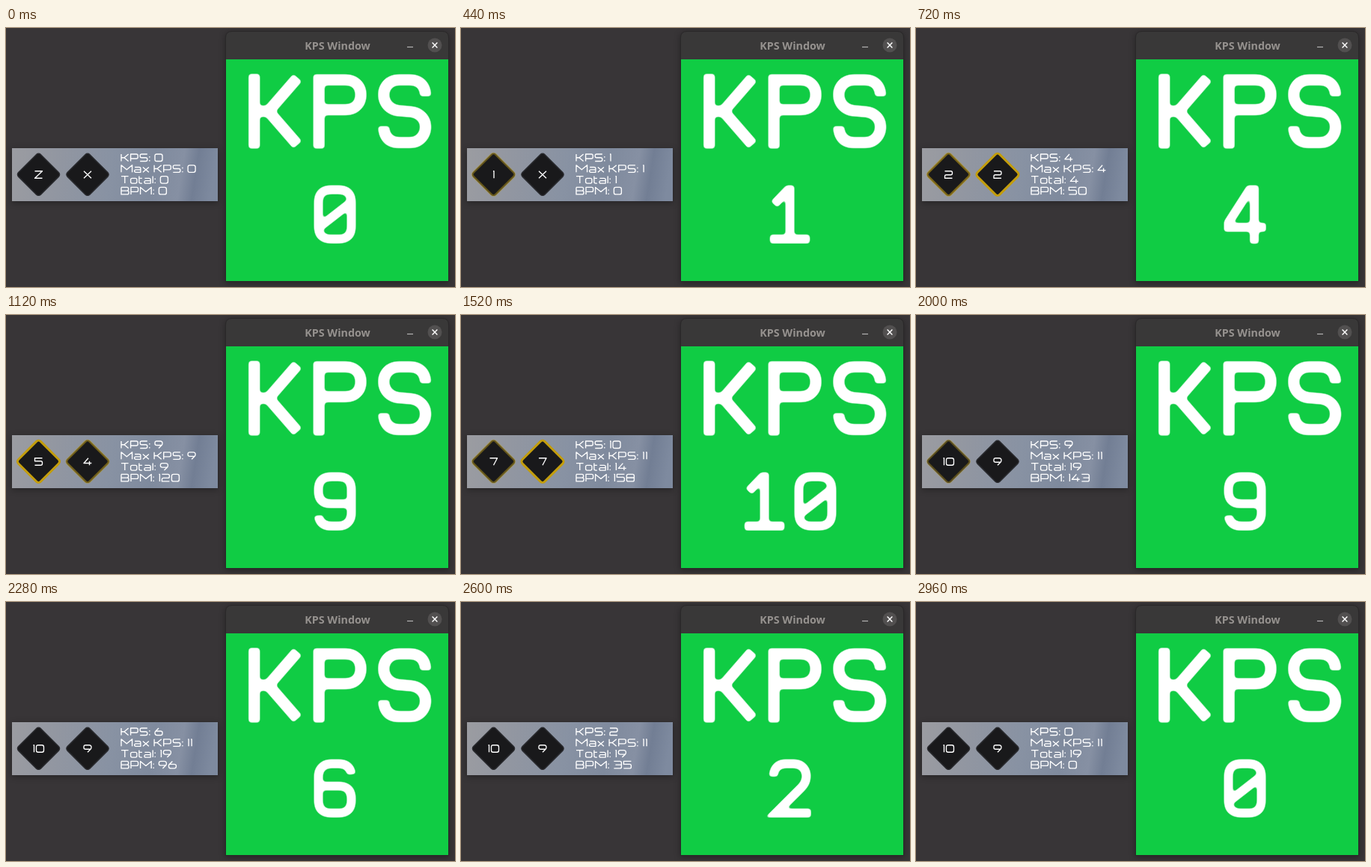
An HTML page that plays this animation: 600x347 px, repeating every 3.16 s.

```html
<!DOCTYPE html>
<html lang="en">
<head>
<meta charset="utf-8">
<title>Key counter</title>
<style>
html, body { margin: 0; height: 100%; overflow: hidden; background: #383537; }
svg { display: block; width: 100vw; height: 100vh; }
.big { fill: none; stroke: #fff; stroke-width: 15.2; filter: url(#soften); }
.small { fill: none; stroke: #fff; stroke-width: 1.35; stroke-linejoin: round; }
.title { font: 700 14.3px "Open Sans", "Noto Sans", sans-serif; fill: #96928f; text-anchor: middle; }
.raised { filter: drop-shadow(0 2px 4px #0005); }
</style>
</head>
<body>
<svg viewBox="0 0 600 347" role="img" aria-label="Keys per second counter">
  <defs>
    <linearGradient id="steel" x2="1" y2=".04">
      <stop offset="0" stop-color="#9b9ca1"/>
      <stop offset=".25" stop-color="#9196a1"/>
      <stop offset=".5" stop-color="#8892a3"/>
      <stop offset=".7" stop-color="#7f8a9d"/>
      <stop offset=".84" stop-color="#8690a3"/>
      <stop offset=".91" stop-color="#727e94"/>
      <stop offset="1" stop-color="#7e8a9f"/>
    </linearGradient>
    <!-- rounds the corners of the big lettering -->
    <filter id="soften" x="-25%" y="-25%" width="150%" height="150%">
      <feGaussianBlur stdDeviation="2"/>
      <feComponentTransfer><feFuncA type="linear" slope="4" intercept="-1.5"/></feComponentTransfer>
    </filter>
  </defs>

  <rect class="raised" x="8" y="161" width="275" height="71" fill="url(#steel)"/>
  <g id="keys"></g>
  <g id="stats" class="small"></g>

  <path class="raised" d="M293.5 339.5V13q0-8.500 8.500-8.500H583q8.500 0 8.500 8.500V339.500Z" fill="#393838" stroke="#2a2829"/>
  <path d="M294 42H591V339H294Z" fill="#10cc44"/>
  <text class="title" x="443" y="28.500">KPS Window</text>
  <path d="M536 25.500H544" stroke="#b5b3b2" stroke-width="1.200"/>
  <circle cx="573" cy="23" r="9.500" fill="#525050"/>
  <path d="M569.600 19.600l6.800 6.800m0-6.800l-6.800 6.800" stroke="#fff" stroke-width="1.400"/>
  <g id="heading" class="big"></g>
  <g id="count" class="big"></g>
</svg>

<script>
const LOOP = 3160, STEP = 40, LAST = 2960;
const SPAN = 840;                       // window in which presses count as current
const presses = Array.from({ length: 19 }, (_, i) => 440 + 79 * i);
const tempo = [[440, 0], [720, 50], [1120, 120], [1520, 158], [1800, 160],
               [1900, 160], [2280, 96], [2780, 0], [LOOP, 0]];

// Heavy centre lines in a 72 x 100 box
const heavy = {
  K: "M8 0V100M8 50H28M66 5L27 50L66 95",
  P: "M8 100V8H44C56 8 64 16 64 28S56 48 44 48H8",
  S: "M64 30C64 15 55 8 44 8H28C16 8 8 17 8 28S16 49 30 49.5L42 50.5C56 51 64 60 64 71S56 92 44 92H28C16 92 8 85 8 70",
  0: "M8 29Q8 8 29 8H43Q64 8 64 29V71Q64 92 43 92H29Q8 92 8 71ZM9 72L63 30",
  1: "M9 33L33 8H36V92M2 92H70",
  2: "M8 30C8 15 17 8 28 8H44C56 8 64 17 64 29Q64 40 56 48L12 92H72",
  3: "M8 27C8 14 18 8 28 8H44C56 8 64 17 64 28S56 49 42 49H26M42 49C56 49 64 60 64 71S56 92 44 92H28C16 92 8 85 8 73",
  4: "M52 100V8H44L8 64V72H72",
  5: "M64 8H10V44H42C56 44 64 54 64 67S56 92 44 92H28C16 92 8 85 8 74",
  6: "M64 26C63 14 55 8 44 8H28C16 8 8 17 8 29V71Q8 92 29 92H43Q64 92 64 71V67Q64 46 43 46H8",
  7: "M0 8H62L28 100",
  8: "M29 8H43Q62 8 62 28T43 48H29Q10 48 10 28T29 8ZM29 48H43Q64 48 64 70T43 92H29Q8 92 8 70T29 48Z",
  9: "M8 74C9 86 17 92 28 92H44C56 92 64 83 64 71V29Q64 8 43 8H29Q8 8 8 29V33Q8 54 29 54H64"
};

// Thin centre lines: [width, path], capitals 9.5 high
const thin = {
  0: [10, "M2.500 0H7.500Q10 0 10 2.500V7Q10 9.500 7.500 9.500H2.500Q0 9.500 0 7V2.500Q0 0 2.500 0Z"],
  1: [1, "M0 0H1V9.5"],
  2: [10, "M0 0H8Q10 0 10 2V3Q10 5 8 5H2Q0 5 0 7V9.5H10"],
  3: [10, "M0 0H8Q10 0 10 2V7.5Q10 9.5 8 9.5H0M2 4.7H10"],
  4: [10, "M6 0L0 6.8H10.3M7.5 4V9.5"],
  5: [10, "M10 0H0V4H8Q10 4 10 6V7.5Q10 9.5 8 9.5H0"],
  6: [10, "M5 0L.8 4.2Q0 5 0 6.5Q0 9.5 3 9.5H7.5Q10 9.5 10 7.2V6Q10 4 7.5 4H1"],
  7: [10, "M0 0H10L5 9.5"],
  8: [10, "M2 0H8Q10 0 10 2V7.5Q10 9.5 8 9.5H2Q0 9.5 0 7.5V2Q0 0 2 0ZM0 4.6H10"],
  9: [10, "M5 9.5L9.2 5.3Q10 4.5 10 3Q10 0 7 0H2.5Q0 0 0 2.3V3.5Q0 5.5 2.5 5.5H9"],
  K: [9.6, "M0 0V9.5M9.6 0L4 4.7H0M4 4.7L9.6 9.5"],
  P: [9.6, "M0 9.5V0H7.6Q9.6 0 9.6 2V4Q9.6 6 7.6 6H0"],
  S: [9.6, "M9.6 0H2Q0 0 0 2V2.7Q0 4.7 2 4.7H7.6Q9.6 4.7 9.6 6.7V7.5Q9.6 9.5 7.6 9.5H0"],
  M: [14.6, "M0 9.5V0L7.3 6L14.6 0V9.5"],
  B: [10, "M0 0V9.5H8Q10 9.5 10 7.5V6.7Q10 4.7 8 4.7H0M8 4.7Q9.6 4.7 9.6 2.7V2Q9.6 0 8 0H0"],
  T: [9.6, "M0 0H9.6M4.8 0V9.5"],
  a: [8.3, "M.5 2.7H6.3Q8.3 2.7 8.3 4.7V9.5H2Q0 9.5 0 7.8T2 6H8.3"],
  o: [8.3, "M2 2.7H6.3Q8.3 2.7 8.3 4.7V7.5Q8.3 9.5 6.3 9.5H2Q0 9.5 0 7.5V4.7Q0 2.7 2 2.7Z"],
  x: [8, "M0 2.7L8 9.5M8 2.7L0 9.5"],
  t: [4, "M0 0V7.5Q0 9.5 2 9.5H4M0 2.7H4"],
  l: [0, "M0 0V9.5"],
  ":": [0, "M0 3V4.4M0 8.1V9.5"],
  Z: [10, "M0 0H10L0 9.5H10"],
  X: [10, "M0 0L10 9.5M10 0L0 9.5"],
  " ": [1.2, ""]
};
const GAP = 3;

const $ = id => document.getElementById(id);
const glyph = (d, x, y) => `<path transform="translate(${x} ${y})" d="${d}"/>`;

function bigText(text, cx, y, scale) {
  const start = -36 - 43.25 * (text.length - 1);
  const marks = [...text].map((c, i) => glyph(heavy[c], start + 86.5 * i, 0)).join("");
  return `<g transform="translate(${cx} ${y}) scale(${scale})">${marks}</g>`;
}

function smallText(text, x, y) {
  return [...text].map(c => {
    const [width, d] = thin[c], mark = glyph(d, x, y);
    x += width + GAP;
    return mark;
  }).join("");
}

function centred(text, cx, y) {
  const width = [...text].reduce((sum, c) => sum + thin[c][0] + GAP, -GAP);
  return smallText(text, cx - width / 2, y);
}

function key(cx, label, glow) {
  const diamond = `<rect x="-21" y="-21" width="42" height="42" rx="4" transform="translate(${cx} 196.300) rotate(45)"`;
  return `${diamond} fill="#19191b" stroke="#2a2b2f" stroke-width="1.500"/>
    ${diamond} fill="none" stroke="#c39d0c" stroke-width="3" opacity="${glow}"/>
    <g class="small">${centred(label, cx, 191.7)}</g>`;
}

const pressedBy = t => presses.filter(p => p <= t);
const rate = t => pressedBy(t).filter(p => p > t - SPAN).length;

function bpm(t) {
  const i = tempo.findIndex(([time]) => time > t);
  if (i < 1) return 0;
  const [t0, a] = tempo[i - 1], [t1, b] = tempo[i];
  return Math.round(a + (b - a) * (t - t0) / (t1 - t0));
}

function glowAt(age) {
  return Math.max(0, Math.min(1, 0.4 + age / 40, (165 - age) / 80));
}

function draw(t) {
  const done = pressedBy(t), kps = rate(t);
  $("keys").innerHTML = ["Z", "X"].map((name, side) => {
    const own = done.filter((_, i) => i % 2 === side);
    const glow = own.length ? glowAt(t - own[own.length - 1]) : 0;
    return key(43.5 + 65.5 * side, String(own.length || name), glow);
  }).join("");
  $("stats").innerHTML = [
    `KPS: ${kps}`,
    `Max KPS: ${Math.max(0, ...done.map(rate))}`,
    `Total: ${done.length}`,
    `BPM: ${bpm(t)}`
  ].map((line, i) => smallText(line, 154, 169 + 14.8 * i)).join("");
  $("count").innerHTML = bigText(String(kps), 439.5, 210.5, 0.785);
}

$("heading").innerHTML = bigText("KPS", 446.2, 61.5, 1);

let shown = -1;
function tick() {
  const t = Math.min(LAST, Math.floor(performance.now() % LOOP / STEP) * STEP);
  if (t !== shown) draw(shown = t);
  requestAnimationFrame(tick);
}
tick();
</script>
</body>
</html>
```
